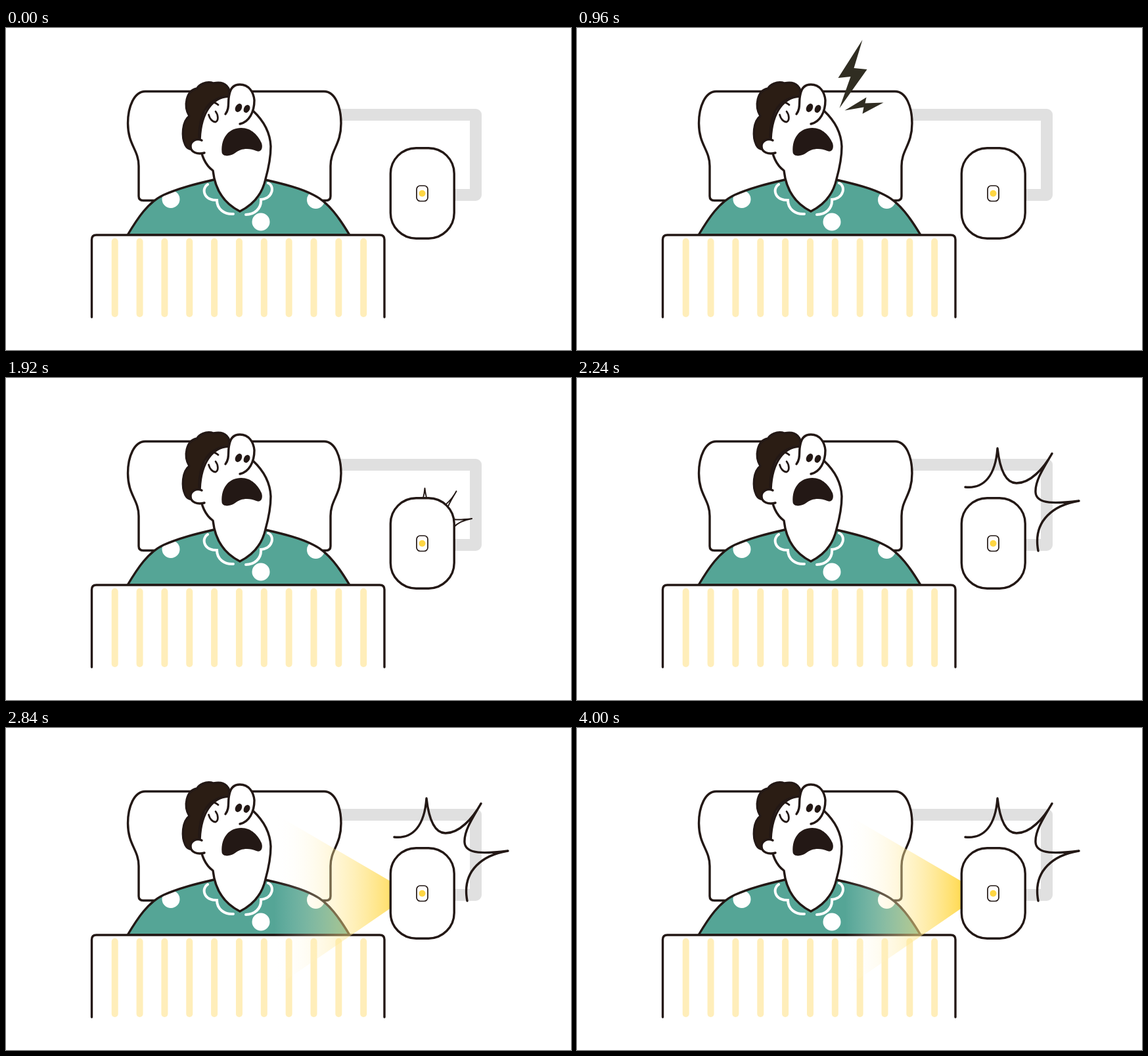
Animation, 860 px wide and 490 px high, one loop 4.08 s. Source, as an HTML page:

```html
<!DOCTYPE html>
<html lang="en">
<head>
<meta charset="utf-8">
<title>Snoring sleeper</title>
<style>
  html, body { margin: 0; width: 100%; height: 100%; overflow: hidden; background: #fff; }
  svg { display: block; width: 100vw; height: 100vh; }
  .line { stroke: #231815; stroke-width: 3.4; stroke-linecap: round; stroke-linejoin: round; }
  .thin { stroke-width: 2.800; }
  .white { fill: #fff; }
  .open { fill: none; }
  .dark { fill: #231815; }
  .bolt { fill: #302d22; }
</style>
</head>
<body>
<svg viewBox="0 0 860 490">
  <defs>
    <linearGradient id="glow" gradientUnits="userSpaceOnUse" x1="408" x2="585" y1="0" y2="0">
      <stop offset="0" stop-color="#fff" stop-opacity="0"/>
      <stop offset="1" stop-color="#ffd640" stop-opacity=".9"/>
    </linearGradient>
    <path id="shirt" d="M185 315C200 290 216 265 240 254C265 243 290 237 316 231H395C425 238 449 244 468 254C491 265 508 290 523 315Z"/>
    <clipPath id="shirtClip"><use href="#shirt"/></clipPath>
  </defs>

  <path d="M500 132H715V254H675" fill="none" stroke="#e0e0e0" stroke-width="18" stroke-linejoin="round"/>

  <!-- pillow -->
  <path class="line white" d="M212 96.500C195 96.500 185.500 120 185.500 145C185.500 178 202 185 202 210V256Q202 262.500 209 262.500H487Q494 262.500 494 256V210C494 185 510 178 510 145C510 120 501 96.500 484 96.500Z"/>

  <!-- shirt -->
  <use href="#shirt" fill="#55a596"/>
  <g class="white" clip-path="url(#shirtClip)">
    <circle cx="251" cy="260.500" r="13.500"/>
    <circle cx="471.500" cy="261.500" r="13.500"/>
    <circle cx="388" cy="295" r="13.500"/>
  </g>
  <use href="#shirt" class="line open"/>

  <!-- head -->
  <path class="line white" d="M340 103C310 106 295 135 295 175C297 195 304 209 315 217C318 244 330 266 356 279C380 267 391 248 395 230C400 212 403 198 403 180C402 158 391 140 376 126Z"/>
  <path class="line" fill="#2b1d14" d="M339 104C343 92 334 80 316 84C304 80 293 87 291 92C274 95 270 119 279 134C268 142 267 166 273 178C277 186 286 187 295 180C293 160 295 140 302 126C310 112 324 105 339 104Z"/>
  <path class="line white" d="M298 171C290 167 281 172 281 180C281 189 291 193 302 190"/>
  <path class="line white" d="M334 131C341 122 337 112 340 101C342 90 348 86 356 86C370 86 377 98 378 110C378 128 370 143 356 146"/>
  <g class="dark">
    <ellipse rx="4.800" ry="6.800" transform="translate(354 121.500) rotate(28)"/>
    <ellipse rx="4.500" ry="6.300" transform="translate(366.500 123) rotate(28)"/>
    <path d="M328.500 189C327 166 340 152 358 152C374 152 384 164 389 175C392 184 387 190 381 187C370 182 357 183 349 190C341 196 329 196 328.500 189Z"/>
  </g>
  <path class="line open thin" d="M308.500 132C310 138 314 143 319 143C324 141 323 132 319 127M311 114C315 112 320 114 323 117"/>
  <path class="open" stroke="#fff" stroke-width="4" stroke-linecap="round" d="M307 238C298 243 299 262 321 262C321 276 333 284 346 283M399 236C409 240 407 259 388 261C389 275 378 284 365 284"/>

  <!-- blanket -->
  <path class="white" d="M131 440V322Q131 315 138 315H569Q576 315 576 322V440Z"/>
  <g id="stripes" stroke="#ffeeba" stroke-width="10" stroke-linecap="round"></g>
  <path class="line open" d="M130.500 440V322Q130.500 315 137.500 315H569Q576 315 576 322V440"/>
  <path id="beam" fill="url(#glow)" d="M590 236L408 130V396L590 271Z"/>

  <path id="burst" class="line open" d="M591 166C620 169 637 148 640 107C644 142 653 160 669 160C690 160 710 138 723 115C708 140 697 158 698 174C699 193 730 191 764 187C728 193 693 215 702 263"/>

  <!-- device -->
  <rect class="line white" x="585.300" y="182.700" width="96.900" height="137.500" rx="39"/>
  <rect class="line white" style="stroke-width:1.700" x="625" y="240" width="17" height="23.500" rx="5.500"/>
  <circle cx="633.500" cy="251.700" r="5" fill="#ffd743"/>

  <!-- bolts are drawn from their lower tip -->
  <path id="bigBolt" class="bolt" d="M0 0L17-48L-2-46L35-104L22-61L42-59Z"/>
  <path id="smallBolt" class="bolt" d="M0 0L33-20L31-11L59-12L27 5L29-5Z"/>
</svg>
<script>
  const LOOP = 4080, STEP = 40;
  const part = id => document.getElementById(id);
  const progress = (t, from, to) => Math.min(1, Math.max(0, (t - from) / (to - from)));
  const easeOut = p => 1 - (1 - p) ** 3;

  part('stripes').innerHTML = Array.from({ length: 11 }, (_, i) =>
    `<path d="M${165.7 + 37.85 * i} 325V435"/>`).join('');

  function place(id, x, y, angle, scale) {
    part(id).setAttribute('transform', `translate(${x} ${y}) rotate(${angle}) scale(${scale})`);
  }

  function draw(now) {
    const t = Math.floor(now % LOOP / STEP) * STEP;

    // Both bolts rock together while they pop in, grow a little and shrink away.
    const swing = (1 - Math.cos((t - 960) / 420 * 2 * Math.PI)) / 2;
    const size = easeOut(progress(t, 520, 720)) * (1 - progress(t, 1700, 1800) ** 2)
      * (1 + 0.03 * progress(t, 960, 1560));
    place('bigBolt', 399.5, 122, 26.5 * swing, size);
    place('smallBolt', 407.5, 125.5, 8.5 * swing, size);

    const spread = easeOut(progress(t, 1840, 2160));
    part('burst').setAttribute('transform',
      `translate(634 251) scale(${spread}) translate(-634 -251)`);
    part('burst').style.visibility = spread ? 'visible' : 'hidden';

    part('beam').setAttribute('opacity', progress(t, 2360, 2920));
  }

  const start = performance.now();
  (function tick() {
    draw(performance.now() - start);
    requestAnimationFrame(tick);
  })();
</script>
</body>
</html>
```
